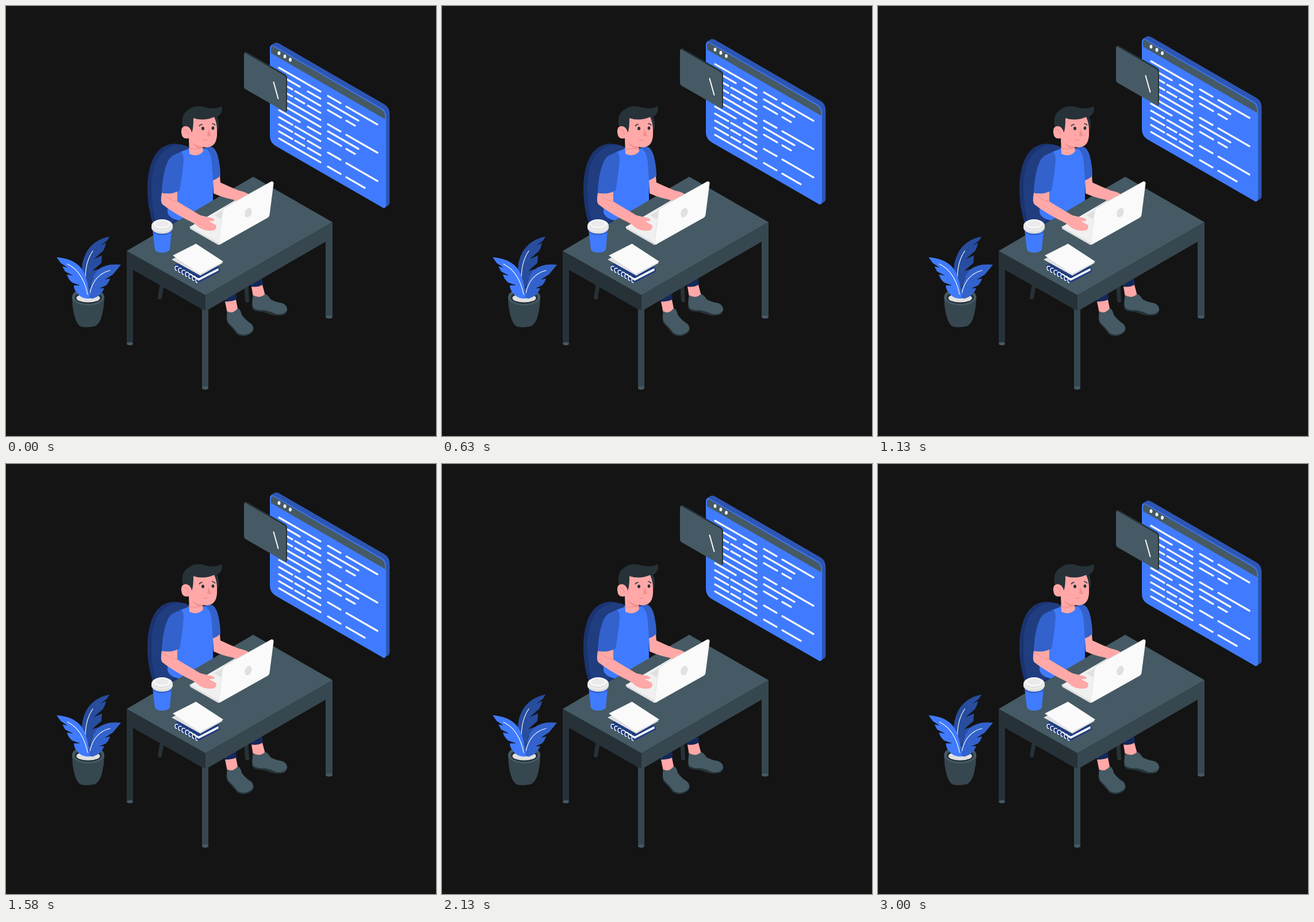
An HTML page for the animation above (3.04 s loop, 748x748 px).

```html
<!DOCTYPE html>
<html lang="en">
<head>
<meta charset="utf-8">
<title>Working at a desk</title>
<style>
  html, body { margin: 0; height: 100%; overflow: hidden; background: #141414; }
  svg { display: block; width: 100vw; height: 100vh; }
  .blue { fill: #407bff; }
  .shade { fill: #3362cc; }
  .deep { fill: #2d56b3; }
  .navy { fill: #203d80; }
  .slate { fill: #455a64; }
  .dim { fill: #37474f; }
  .dark { fill: #263238; }
  .skin { fill: #ffa8a7; }
  .white { fill: #fafafa; }
  .gray { fill: #e0e0e0; }
  .line { fill: none; stroke: #fafafa; stroke-linecap: round; }
</style>
</head>
<body>
<svg viewBox="0 0 748 748">
  <!-- chair -->
  <path fill="#1b3370" d="M318 247Q305 239 291 239.500Q264 242 253 272Q245 294 246 326Q247 352 255 378L300 380L318 300Z"/>
  <path class="navy" d="M322 248Q312 241 300 241Q272 245 260 273Q252 294 253 326Q254 350 260 374L285 384L320 330Z"/>
  <path class="line" style="stroke:#263238;stroke-width:7" d="M271 486L267.500 507M418 487L419.500 512"/>

  <!-- legs and shoes -->
  <path fill="#14285a" d="M378 505L400 497L401 512Q390 516 381 514ZM424 480L445 470L447 485Q437 490 427 488Z"/>
  <path class="skin" d="M381 514Q391 515 400 511L404 531L394 538L385 534ZM427 488Q437 490 446 485L451 504L441 511L430 506Z"/>
  <path class="dark" d="M384 540Q382 549 387 554Q394 561 400 569Q406 576 418 574Q431 569 431 562L410 545ZM428 515Q426 529 435 531Q450 532 458 536Q472 541 484 537Q490 533 489 527L450 515Z"/>
  <path class="slate" d="M385 531Q394 537 403 526Q408 527 410 537Q416 546 427 553Q433 559 428 566Q415 576 403 569Q396 559 388 552Q382 545 385 531ZM430 503Q441 510 451 501Q456 503 460 510Q468 515 481 517Q490 521 489 529Q484 538 470 536Q460 531 449 529Q436 530 430 525Q427 516 430 503Z"/>

  <!-- torso -->
  <path class="shade" d="M343 248L355 244Q365 246 369 263Q373 280 373 296Q368 301 360 303L352 270Z"/>
  <path class="blue" d="M303 254L319 248Q331 258 343 247L349 249Q357 256 358 275L360 303V345L306 374Q284 371 281 359V300Z"/>

  <!-- desk -->
  <path class="dark" d="M210 426L347 503V531L221 459V587H210Z"/>
  <path class="dim" d="M347 503L568 376V541H556V410L352 528V664H341V527L347 530Z"/>
  <path class="slate" d="M430 297L568 376L347 503L210 426Z"/>
  <g class="slate">
    <ellipse cx="215.500" cy="587.500" rx="5.500" ry="2.700"/>
    <ellipse cx="346.500" cy="664.500" rx="5.700" ry="2.900"/>
    <ellipse cx="562" cy="541" rx="6" ry="2.700"/>
  </g>

  <!-- laptop base and arms -->
  <path class="gray" d="M320 383L370 411V416L321 388Q319 386 320 383Z"/>
  <path fill="#f0f0f0" d="M320 384L402 336L453 364L370 412Z"/>
  <path class="gray" d="M362 364L402 341L412 347L372 370Z"/>
  <path class="skin" d="M360 303Q367 301 372 296L373 307Q390 315 405 321Q420 324 427 331L413 341Q404 346 396 337Q379 334 361 326Z"/>
  <path class="skin" d="M271 325Q286 328 298 322L298 340Q316 351 338 364L359 369Q365 372 361 374L353 374L365 381Q368 386 362 390Q349 393 337 386Q329 378 315 372Q290 359 272 345Q268 341 271 325Z"/>
  <path class="shade" d="M305 254Q288 258 282 269Q272 291 271 325Q287 329 302 321Q307 293 309 267Q309 258 305 254Z"/>
  <path fill="none" stroke="#f28f8f" d="M274 329Q284 337 298 340"/>

  <!-- laptop screen -->
  <path class="gray" d="M376 357L380 350L462 305L464 307L380 353L373 415L369.500 415Z"/>
  <path class="white" d="M382 351L461 305.500Q466 304 465.500 309L458.500 363Q458 367 454 369L373 414.500Q370 415.500 370.500 411L377 358Q378 353 382 351Z"/>
  <ellipse class="gray" cx="421.300" cy="359.500" rx="5.700" ry="8.500" transform="rotate(22 421.300 359.500)"/>

  <!-- head -->
  <path class="dark" d="M308 211Q302 187 321 178Q332 171 350 177Q366 180 375 174Q379 185 367 193Q372 201 369 215L362 222H320Q312 220 308 211Z"/>
  <path class="skin" d="M326 195Q344 201 362 193Q368 204 367 225Q366 242 354 245Q348 247 342 245L343 253Q333 264 319 257L318 230Q306 233 305 220Q304 209 313 209Q321 210 323 220Q326 215 326 195Z"/>
  <path fill="#f28f8f" d="M323 237Q331 244 342 245V249Q329 247 323 237Z"/>
  <path fill="none" stroke="#f28f8f" stroke-width="1.300" stroke-linecap="round" d="M309 215Q315 214 317 223M343 232Q347 236 350 232.500M318 248Q330 250 342 247"/>
  <path fill="#f28f8f" d="M352 214L357 225Q353 228 350 225Z"/>
  <g class="dark">
    <ellipse cx="342.500" cy="213" rx="2.500" ry="3"/>
    <ellipse cx="360" cy="212.500" rx="2.300" ry="3"/>
  </g>
  <path class="line" style="stroke:#263238;stroke-width:1.700" d="M336.500 208.500Q338 206 341 206M359 204.500Q361.500 204.500 363.500 207"/>

  <!-- cup -->
  <path class="blue" d="M255 389L259 424Q263 429 271 429Q281 429 285 424L288 389Z"/>
  <path class="shade" d="M255 390Q271 400 288 390L287 395Q271 402 256 395Z"/>
  <path class="gray" d="M253 383V387Q257 396 271.500 396Q286 396 290 387V383Z"/>
  <ellipse fill="#ebebeb" cx="271.500" cy="382" rx="18.500" ry="10.500"/>
  <ellipse class="gray" cx="271.500" cy="380.500" rx="15.500" ry="9"/>
  <ellipse class="white" cx="271.500" cy="379" rx="15" ry="8"/>
  <ellipse fill="#ebebeb" cx="271.500" cy="379" rx="12" ry="5.800"/>

  <!-- notebook -->
  <path class="navy" d="M293 452L333 431L372 458V462L334 482L293 459Z"/>
  <path class="white" d="M302 454L335 474L369 456L370 460L335 478Z"/>
  <path class="navy" d="M293 451L333 431L371 455L335 473Z"/>
  <path id="rings" class="line" stroke-width="1.500"/>
  <path class="gray" d="M288 441L327 421L377 447L338 469Z"/>
  <path class="white" d="M290 434L330.500 413.500L378 444.500L337 466Z"/>

  <!-- plant -->
  <path class="dim" d="M115 506Q115 526 120 542Q124 555 131 558Q143 560 155 557Q163 553 167 538Q171 522 171 506Z"/>
  <ellipse class="slate" cx="143" cy="506" rx="28" ry="15"/>
  <ellipse class="dark" cx="143" cy="507" rx="23.500" ry="11"/>
  <ellipse class="gray" cx="143" cy="508" rx="20.500" ry="7.500"/>
  <path fill="#284d9f" d="M180 401Q151 407 139 430Q131 446 132 462L144 494L150 474Q160 466 164 457L150 461L166 447L167 434L153 440L169 426Q173 419 174 412L164 417L176 408Z"/>
  <path class="line" stroke-width="1.200" d="M151 426Q139 443 138 471"/>
  <path class="shade" d="M200 450Q174 447 160 459Q146 474 144 508L151 509Q165 505 171 491L163 491L174 486Q179 481 181 474L172 476L186 467Z"/>
  <path class="blue" d="M88 437Q116 439 130 455Q143 471 145 509Q133 510 125 501Q118 494 118 486L129 486L115 481Q108 475 106 467L117 469L103 462L98 453L107 455L95 447Z"/>
  <path class="line" stroke-width="1.200" d="M107 449Q134 462 142 502M181 460Q153 467 146 499"/>

  <!-- floating windows -->
  <g id="float">
    <path class="deep" d="M461 68L468 64Q472 63 476 65.700L659 171.500Q667 176.500 667.300 187V342Q667 346 664 347.500L656 352Z"/>
    <path class="blue" d="M459 74Q459 65.500 467 70L653 177.500Q661 182 661 192V346Q661 354 654 350L470 244Q459 238 459 226Z"/>
    <path class="slate" d="M461 75Q461 68 467 71.500L652 179Q659.500 183 659.500 193V197L461 82Z"/>
    <g class="white">
      <ellipse cx="475" cy="82" rx="2.400" ry="3.300"/>
      <ellipse cx="485" cy="87.700" rx="2.400" ry="3.300"/>
      <ellipse cx="494.500" cy="93.400" rx="2.400" ry="3.300"/>
    </g>
    <path id="code" class="line" stroke-width="3.200"/>
    <path class="dark" d="M414 82L416.500 80Q418 79.500 420 81L486 119Q489 121 489 125V181Q489 184 486 184.500L480 170Z"/>
    <path class="slate" d="M414 84.500Q414 80.500 417.500 82.500L484 121Q487 123 487 127V181Q487 185 484 183.500L417 145Q414 143 414 139.500Z"/>
    <path class="line" stroke-width="2" d="M465.500 132.500L473.500 161"/>
  </g>
</svg>
<script>
const $ = id => document.getElementById(id);

// One string per row of text: start-end pairs along x.
const rows = [
  '475-547 560-582 592-646',
  '475-511 525-547 560-613',
  '475-498 503-547 560-583 592-607',
  '475-498 503-519 525-547',
  '475-547 560-582 592-646',
  '475-547 560-613',
  '475-511 525-547 560-583 592-607',
  '475-498 503-547',
  '475-498 503-519 525-547 560-582 592-646',
  '475-498 503-519 525-547',
  '475-547 560-582 592-624'
];
const slope = 0.577, pitch = 12.3;
$('code').setAttribute('d', rows.map((row, i) => row.split(' ').map(span => {
  const [a, b] = span.split('-').map(x => `${x} ${106.8 + pitch * i + slope * (x - 474)}`);
  return `M${a}L${b}`;
}).join('')).join(''));

$('rings').setAttribute('d', Array.from({ length: 7 }, (_, i) =>
  `M${299 + 6 * i} ${453 + 3.5 * i}q-5 -2 -5 3q0 4 3 4`).join(''));

// Steady rise and fall, with a short rest at the end of each loop.
const loop = 3040, half = 1500, lift = 15;
function draw(now) {
  const t = Math.min(now % loop, 2 * half);
  const y = -lift * (1 - Math.abs(t - half) / half);
  $('float').setAttribute('transform', `translate(0 ${y})`);
  requestAnimationFrame(draw);
}
draw(0);
</script>
</body>
</html>
```
